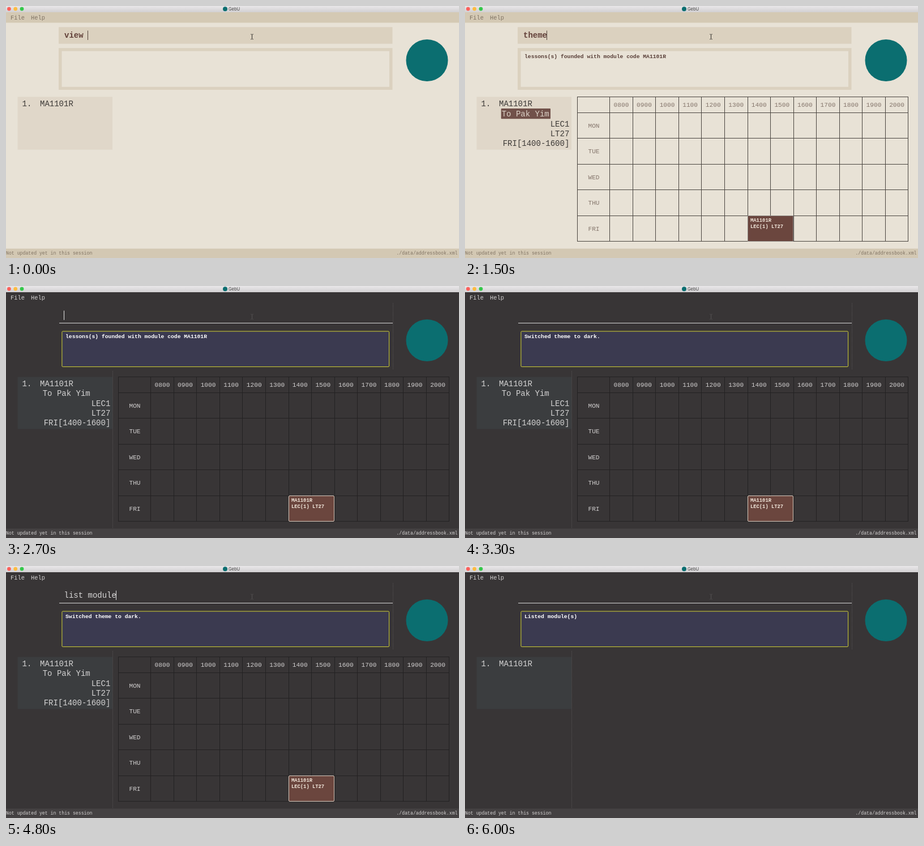
These frames come from a looping animation (800 px wide and 445 px high, 6100 ms). An HTML page:

```html
<!DOCTYPE html>
<html lang="en">
<head>
<meta charset="utf-8">
<title>Timetable themes</title>
<style>
  html, body { margin: 0; width: 100%; height: 100%; overflow: hidden; }
  svg { display: block; width: 100vw; height: 100vh; }
  text { font-family: "Liberation Mono", "Courier New", monospace; white-space: pre; fill: var(--text); }
  .ui { fill: var(--menu); }
  .label { fill: var(--label); }
  .bold { font-weight: bold; }
  .light { --text: #3d3a37; --menu: #807363; --label: #85766c; --cmd: #613f38; --name: #ddd3c8; --msg: #593f38; --caret: #51423b; --beam: #2c2927; }
  .dark { --text: #d4d3d3; --menu: #d4d2d2; --label: #d0cece; --cmd: #d9d8d8; --name: #d4d3d3; --msg: #ffffff; --caret: #e6e6e6; --beam: #555253; }
</style>
</head>
<body>
<svg id="stage" viewBox="0 0 800 445" preserveAspectRatio="none" xmlns="http://www.w3.org/2000/svg">
  <defs>
    <linearGradient id="chrome" x2="0" y2="1">
      <stop offset="0" stop-color="#e9e7e9"/>
      <stop offset="1" stop-color="#d2d0d2"/>
    </linearGradient>
  </defs>
</svg>
<script>
const NS = 'http://www.w3.org/2000/svg';
const LOOP = 6100, STEP = 100;
const SHOW_GRID = 900, GO_DARK = 2700, SWITCHED = 2800, LISTED = 5200;
const stage = document.getElementById('stage');

function add(parent, tag, attrs, content) {
  const el = document.createElementNS(NS, tag);
  for (const key in attrs) el.setAttribute(key, attrs[key]);
  if (content !== undefined) el.textContent = content;
  parent.appendChild(el);
  return el;
}
const group = parent => add(parent, 'g', {});
const rect = (parent, x, y, x2, y2, fill, more) =>
  add(parent, 'rect', { x, y, width: x2 - x, height: y2 - y, fill, ...more });
const label = (parent, x, y, size, content, more) =>
  add(parent, 'text', { x, y, 'font-size': size, ...more }, content);
const path = (parent, d, stroke, more) =>
  add(parent, 'path', { d, stroke, fill: 'none', ...more });
const show = (el, on) => el.setAttribute('visibility', on ? 'inherit' : 'hidden');

// Theme backdrops
const light = group(stage);
rect(light, 0, 0, 800, 445, '#e8e2d6');
rect(light, 0, 11, 800, 29.5, '#d4c9b4');
rect(light, 0, 428.5, 800, 445, '#d3c8b3');
rect(light, 93, 37.3, 682.5, 66.7, '#dbd1bf');
rect(light, 93, 74.3, 682.5, 148, '#dbd1bf');
rect(light, 98.5, 79.7, 677, 142.8, '#e8e2d6');
rect(light, 20.5, 160.5, 188, 253.7, '#e0d7c9');

const dark = group(stage);
rect(dark, 0, 0, 800, 445, '#383536');
rect(dark, 0, 428.3, 800, 445, '#444142');
path(dark, 'M94 65.5H683', '#d9d8d8');
path(dark, 'M683.5 30V148M188.5 150V428', '#555253', { 'stroke-dasharray': '1 1' });
rect(dark, 98.9, 80, 676.6, 142.6, '#3b3a50', { stroke: '#d2d137', rx: 1.5 });
rect(dark, 20.5, 160.5, 188, 252.5, '#3b3d3f');

// Window bar
rect(stage, 0, 0, 800, 11, 'url(#chrome)');
['#fc605b', '#fdbc40', '#34c84a'].forEach((fill, i) =>
  add(stage, 'circle', { cx: 5.4 + 11.3 * i, cy: 5.1, r: 3.4, fill }));
add(stage, 'circle', { cx: 387, cy: 5.3, r: 4, fill: '#0b6e70' });
label(stage, 393, 8, 7.5, 'GebU', { style: 'font-family:Inter,sans-serif;fill:#414041' });

// Fixed texts and emblem
const ui = { class: 'ui' };
label(stage, 8, 24, 10.4, 'File', ui);
label(stage, 44, 24, 10.4, 'Help', ui);
label(stage, 0, 439.4, 8.2, 'Not updated yet in this session', ui);
label(stage, 797.5, 439.4, 8.2, './data/addressbook.xml', { class: 'ui', 'text-anchor': 'end' });
add(stage, 'circle', { cx: 743.5, cy: 96, r: 37, fill: '#0b6e70' });

label(stage, 28.5, 177, 14, '1.');
label(stage, 60, 177, 14, 'MA1101R');

// Lesson details and timetable
const lesson = group(stage);
const details = group(lesson);
const nameBox = rect(details, 63.7, 181, 151, 199.2, '#71514a', { rx: 1 });
label(details, 64.7, 195, 14, 'To Pak Yim', { style: 'fill:var(--name)' });
['LEC1', 'LT27', 'FRI[1400-1600]'].forEach((line, i) =>
  label(details, 184.3, 212.7 + 17.1 * i, 14, line, { 'text-anchor': 'end' }));

const colX = i => 255.7 + 40.55 * i;
const rowY = i => 188.2 + 45.5 * i;
const snap = v => Math.floor(v) + .5;
let lines = 'M198.5 160V416M198 160.5H783';
for (let i = 0; i <= 13; i++) lines += `M${snap(colX(i))} 160V416`;
for (let i = 0; i <= 5; i++) lines += `M198 ${snap(rowY(i))}H783`;
const grid = path(lesson, lines, '');
const mid = { class: 'label', 'text-anchor': 'middle' };
for (let i = 0; i < 13; i++)
  label(lesson, colX(i + .5), 178.4, 11.2, String(8 + i).padStart(2, '0') + '00', mid);
['MON', 'TUE', 'WED', 'THU', 'FRI'].forEach((day, i) =>
  label(lesson, 227.5, rowY(i + .5) + 3.9, 11.2, day, mid));

const slot = rect(lesson, 499.5, 370.5, 579.5, 415.5, '#6b463e');
const slotText = { class: 'bold', style: 'fill:#f2e8dc' };
label(lesson, 504, 381.2, 8.8, 'MA1101R', slotText);
label(lesson, 504, 391.6, 8.8, 'LEC(1) LT27', slotText);

// Result, command, pointer
const message = label(stage, 105, 92.4, 9.7, '', { class: 'bold', style: 'fill:var(--msg)' });
const command = label(stage, 103, 56.2, 14, '', { style: 'fill:var(--cmd)' });
const caret = add(stage, 'rect', { y: 43.5, width: 1, height: 16.5, style: 'fill:var(--caret)' });
path(stage, 'M432.3 50H433.6L434.5 50.8L435.4 50H436.7M434.5 50.8V57.8M432.3 58.6H433.6L434.5 57.8L435.4 58.6H436.7', '',
  { style: 'stroke:var(--beam)' });

// Each entry: the text, how much is already there, and when each key lands
const entries = [
  { start: 0, text: 'view MA1101R', typed: 5, keys: [100, 200, 300, 400, 500, 600, 700] },
  { start: SHOW_GRID, text: 'theme dark', typed: 0, keys: [1100, 1200, 1300, 1400, 1500, 1700, 1900, 2000, 2100, 2200] },
  { start: GO_DARK, text: 'list module', typed: 0, keys: [3600, 3700, 3800, 3900, 4000, 4200, 4300, 4400, 4500, 4700, 4800] },
  { start: LISTED, text: '', typed: 0, keys: [] }
];

function render(time) {
  const t = Math.floor(time % LOOP / STEP) * STEP;
  const isDark = t >= GO_DARK;
  stage.setAttribute('class', isDark ? 'dark' : 'light');
  show(light, !isDark);
  show(dark, isDark);

  show(lesson, t >= SHOW_GRID && t < LISTED);
  show(nameBox, !isDark);
  details.setAttribute('transform', `translate(0 ${isDark ? -.8 : 0})`);
  grid.setAttribute('stroke', isDark ? '#232122' : '#4a4540');
  slot.setAttribute('stroke', isDark ? '#d6cabd' : '#8c8883');
  slot.setAttribute('rx', isDark ? 1.5 : 0);

  message.textContent = t < SHOW_GRID ? ''
    : t < SWITCHED ? 'lessons(s) founded with module code MA1101R'
    : t < LISTED ? 'Switched theme to dark.' : 'Listed module(s)';

  const entry = entries.filter(e => e.start <= t).pop();
  const pressed = entry.keys.filter(k => k <= t);
  const count = entry.typed + pressed.length;
  const since = t - (pressed.length ? pressed[pressed.length - 1] : entry.start);
  command.textContent = entry.text.slice(0, count);
  command.setAttribute('font-weight', isDark ? 'normal' : 'bold');
  command.setAttribute('x', isDark ? 102.5 : 103);
  caret.setAttribute('x', Math.floor(102.4 + count * 8.4));
  show(caret, since % 1000 < 500);
}

function tick() {
  render(performance.now());
  requestAnimationFrame(tick);
}
tick();
</script>
</body>
</html>
```
